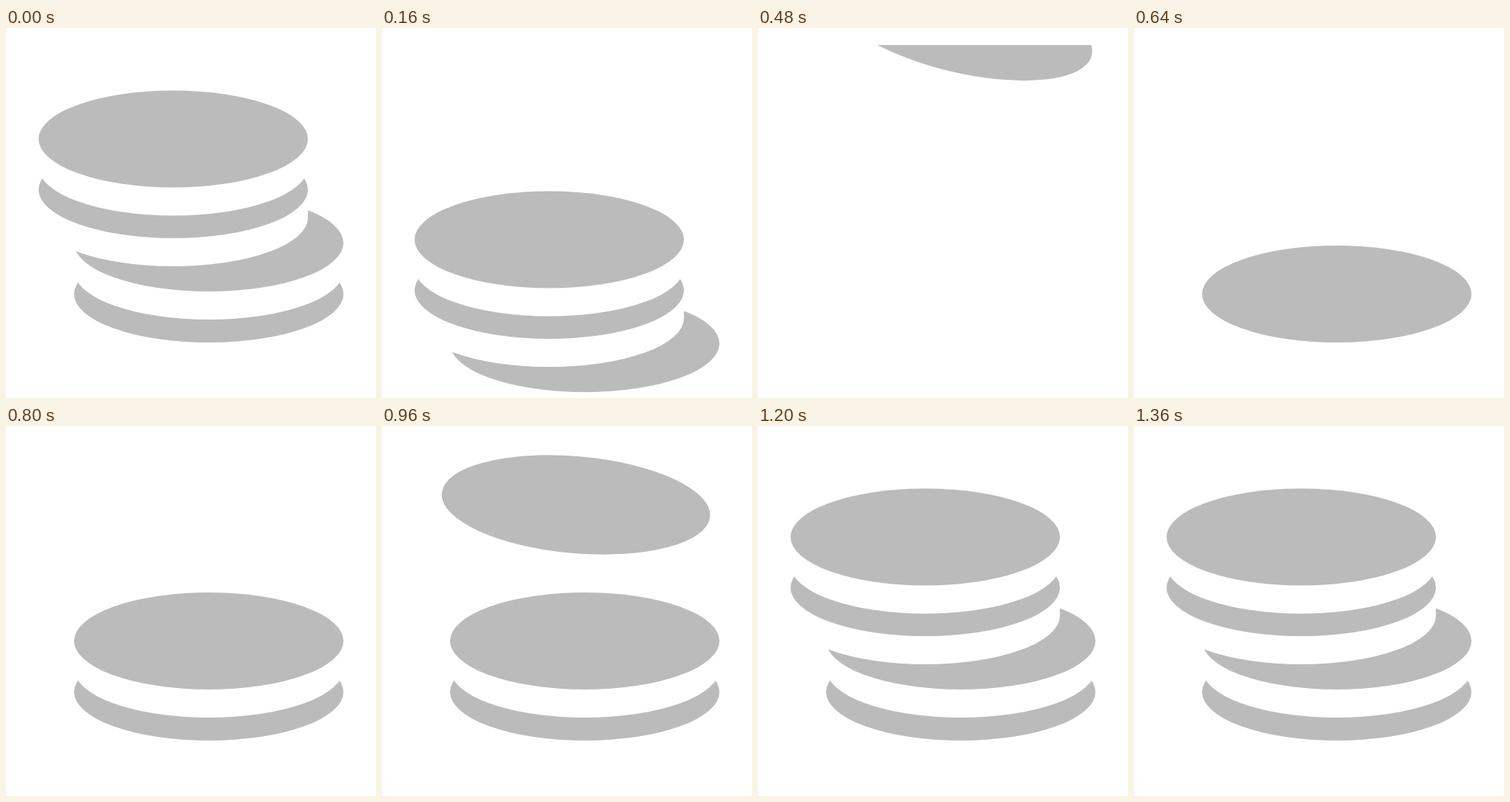
Write an HTML page that moves like this. It is 500 px wide and 500 px high and loops after 1440 ms.

```html
<!DOCTYPE html>
<html lang="en">
<head>
<meta charset="utf-8">
<title>Coin stack</title>
<style>
  html, body { margin: 0; width: 100%; height: 100%; overflow: hidden; background: #fff; }
  svg { display: block; width: 100%; height: 100%; }
</style>
</head>
<body>
<svg viewBox="0 0 500 500">
  <defs>
    <clipPath id="window"><rect y="23" width="500" height="477"/></clipPath>
    <g id="coin">
      <path d="M-182 0v38a182 65.5 0 0 0 364 0v-38z" fill="#fff"/>
      <ellipse rx="182" ry="65.5" fill="#bbb"/>
    </g>
  </defs>
  <g id="stack" clip-path="url(#window)"></g>
</svg>
<script>
const STEP = 80, STEPS = 18, FALL_STEPS = 4, DIP_STEP = 16;

// Bottom to top. flight: [dx, dy, tilt] for each step before landing, last one first.
const coins = [
  { x: 274, y: 359.5, land: 8, weight: 1.4, flight: [[0, -180, 6.5], [0, -365, 13.5]] },
  { x: 274, y: 290.5, land: 10, weight: 1, flight: [] },
  { x: 226, y: 218.5, land: 13, weight: 1, flight: [[36, -112, 5]] },
  { x: 226, y: 150, land: 15, weight: 1, flight: [] }
];

const stack = document.getElementById("stack");
for (const coin of coins) {
  coin.node = document.createElementNS("http://www.w3.org/2000/svg", "use");
  coin.node.setAttribute("href", "#coin");
  stack.append(coin.node);
}

function pose(coin, step) {
  if (step < FALL_STEPS) return [0, 34 * step * step * coin.weight, 0];
  if (step >= coin.land) return [0, step === DIP_STEP ? 12 : 0, 0];
  return coin.flight[coin.land - step - 1];
}

function draw(time) {
  const step = Math.floor(time / STEP) % STEPS;
  for (const coin of coins) {
    const p = pose(coin, step);
    coin.node.setAttribute("visibility", p ? "visible" : "hidden");
    if (p) coin.node.setAttribute("transform",
      `translate(${coin.x + p[0]} ${coin.y + p[1]}) rotate(${p[2]})`);
  }
}

let start;
function tick(now) {
  start ??= now;
  draw(now - start);
  requestAnimationFrame(tick);
}
draw(0);
requestAnimationFrame(tick);
</script>
</body>
</html>
```
